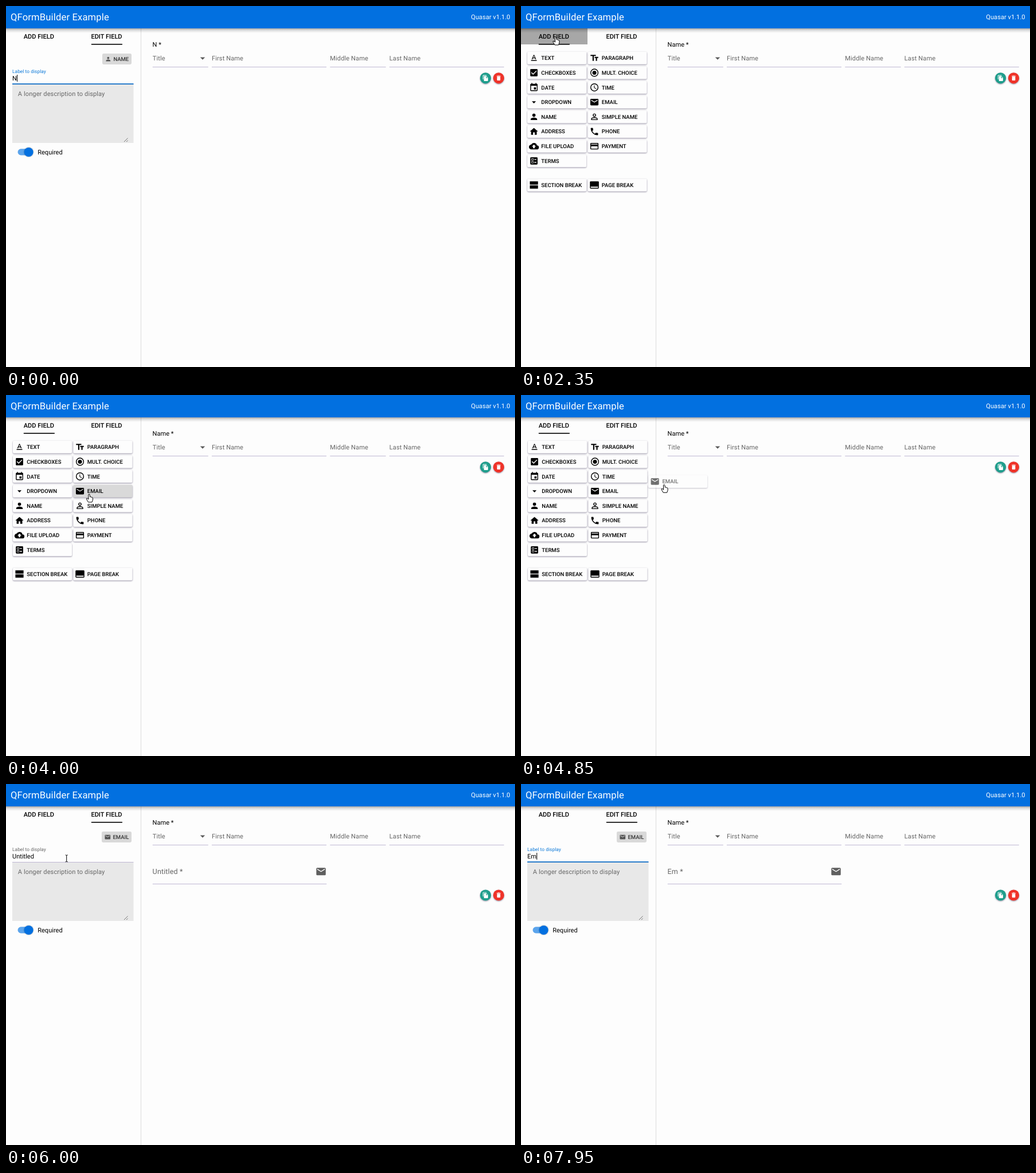
An HTML page for the animation above (8000 ms loop, 888 by 630 pixels).

```html
<!DOCTYPE html>
<html lang="en">
<head>
<meta charset="utf-8">
<title>Form builder</title>
<style>
html, body { margin: 0; width: 100%; height: 100%; overflow: hidden; background: #fdfdfd; }
svg { display: block; width: 888px; height: 630px; }
text { font-family: Roboto, Arial, sans-serif; font-size: 11.05px; white-space: pre; text-rendering: geometricPrecision; }
.tab { font-weight: 500; text-anchor: middle; }
.btn { font-weight: 500; font-size: 9.5px; }
.label { fill: #666; letter-spacing: .00937em; }
.raised { filter: drop-shadow(0 1px 1px rgba(40, 30, 70, .5)); }
</style>
</head>
<body>
<svg id="stage" viewBox="0 0 888 630">
  <defs>
    <linearGradient id="shade" x2="0" y2="1">
      <stop stop-color="#000" stop-opacity=".34"/>
      <stop offset=".4" stop-color="#000" stop-opacity=".13"/>
      <stop offset="1" stop-color="#000" stop-opacity="0"/>
    </linearGradient>
    <clipPath id="side"><rect y="39" width="235" height="591"/></clipPath>
  </defs>
  <rect width="888" height="630" fill="#fdfdfd"/>
</svg>
<script>
const LOOP = 8000, BLUE = '#0270e0', LINE = '#bfb8d4';
const ADD_AT = 2099, DROP_AT = 5227, FOCUS_AT = 6358;
const stage = document.getElementById('stage');

// Icons on a 24 unit grid
const ICONS = {
  text: 'M5 17v2h14v-2zM9.5 12.8h5l.9 2.2h2.1L12.75 4h-1.5L6.5 15h2.1zM12 6l1.87 5h-3.74z',
  paragraph: 'M2.5 4v3h5v12h3V7h5V4zM21.5 9h-9v3h3v7h3v-7h3z',
  check: 'M5 3h14a2 2 0 0 1 2 2v14a2 2 0 0 1-2 2H5a2 2 0 0 1-2-2V5a2 2 0 0 1 2-2zM10 17l9-9-1.4-1.4L10 14.2l-3.6-3.6L5 12z',
  radio: 'M2 12a10 10 0 1 0 20 0a10 10 0 1 0-20 0zM4 12a8 8 0 1 0 16 0a8 8 0 1 0-16 0zM7 12a5 5 0 1 0 10 0a5 5 0 1 0-10 0z',
  date: 'M17 12h-5v5h5zM16 1v2H8V1H6v2H5a2 2 0 0 0-2 2v14a2 2 0 0 0 2 2h14a2 2 0 0 0 2-2V5a2 2 0 0 0-2-2h-1V1zM19 19H5V8h14z',
  time: 'M2 12a10 10 0 1 0 20 0a10 10 0 1 0-20 0zM4 12a8 8 0 1 0 16 0a8 8 0 1 0-16 0zM12.5 7H11v6l5.25 3.15.75-1.23-4.5-2.67z',
  drop: 'M7 10l5 5 5-5z',
  email: 'M4 4h16a2 2 0 0 1 2 2v12a2 2 0 0 1-2 2H4a2 2 0 0 1-2-2V6a2 2 0 0 1 2-2zM20 8V6l-8 5-8-5v2l8 5z',
  person: 'M8 8a4 4 0 1 0 8 0a4 4 0 1 0-8 0zM12 14c-2.7 0-8 1.3-8 4v2h16v-2c0-2.7-5.3-4-8-4z',
  outline: 'M8 8a4 4 0 1 0 8 0a4 4 0 1 0-8 0zM9.9 8a2.1 2.1 0 1 0 4.2 0a2.1 2.1 0 1 0-4.2 0zM12 13c-2.7 0-8 1.3-8 4v3h16v-3c0-2.7-5.3-4-8-4zM12 14.9c3 0 6.1 1.5 6.1 2.1v1.1H5.9V17c0-.6 3.1-2.1 6.1-2.1z',
  home: 'M10 20v-6h4v6h5v-8h3L12 3 2 12h3v8z',
  phone: 'M6.6 10.8a15 15 0 0 0 6.6 6.6l2.2-2.2a1 1 0 0 1 1-.25 11 11 0 0 0 3.6.55 1 1 0 0 1 1 1V20a1 1 0 0 1-1 1A17 17 0 0 1 3 4a1 1 0 0 1 1-1h3.5a1 1 0 0 1 1 1 11 11 0 0 0 .57 3.6 1 1 0 0 1-.25 1z',
  upload: 'M19.35 10A7.5 7.5 0 0 0 5.35 8 6 6 0 0 0 6 20h13a5 5 0 0 0 .35-10zM14 13v4h-4v-4H7l5-5 5 5z',
  card: 'M4 4h16a2 2 0 0 1 2 2v12a2 2 0 0 1-2 2H4a2 2 0 0 1-2-2V6a2 2 0 0 1 2-2zM20 18v-6H4v6zM20 8V6H4v2z',
  terms: 'M5 3h14a2 2 0 0 1 2 2v14a2 2 0 0 1-2 2H5a2 2 0 0 1-2-2V5a2 2 0 0 1 2-2zM13 7.5v2h5v-2zM13 14.5v2h5v-2zM6 6v5h5V6zM7 7h3v3H7zM6 13v5h5v-5zM7 14h3v3H7z',
  section: 'M2 3h20v8H2zM2 13h20v8H2z',
  page: 'M3 3h18a2 2 0 0 1 2 2v14a2 2 0 0 1-2 2H3a2 2 0 0 1-2-2V5a2 2 0 0 1 2-2zM3 16v3h18v-3z',
  copy: 'M16 1H4a2 2 0 0 0-2 2v14h2V3h12zM15 5l6 6v10a2 2 0 0 1-2 2H8a2 2 0 0 1-2-2V7a2 2 0 0 1 2-2zM14 12h5.5L14 6.5z',
  trash: 'M6 19a2 2 0 0 0 2 2h8a2 2 0 0 0 2-2V7H6zM19 4h-3.5l-1-1h-5l-1 1H5v2h14z'
};

function add(parent, tag, attrs, content) {
  const node = document.createElementNS('http://www.w3.org/2000/svg', tag);
  set(node, attrs);
  if (content) node.textContent = content;
  return parent.appendChild(node);
}
function set(node, attrs) {
  for (const key in attrs) node.setAttribute(key, attrs[key]);
}
const group = (parent, attrs = {}) => add(parent, 'g', attrs);
const text = (parent, x, y, content, attrs) => add(parent, 'text', { x, y, ...attrs }, content);
const rect = (parent, x, y, width, height, fill, attrs) =>
  add(parent, 'rect', { x, y, width, height, fill, ...attrs });
const show = (node, on) => node.setAttribute('display', on ? 'inline' : 'none');
const move = (node, x, y = 0) => node.setAttribute('transform', `translate(${x} ${y})`);
function icon(parent, name, cx, cy, size, fill = '#000') {
  const k = size / 24;
  return add(parent, 'path', {
    d: ICONS[name], fill, 'fill-rule': 'evenodd',
    transform: `translate(${cx - size / 2} ${cy - size / 2}) scale(${k})`
  });
}

// Side panel
const side = group(stage, { 'clip-path': 'url(#side)' });
const tabGlow = rect(side, 0, 39, 116, 28, '#000');
const addPanel = group(side), editPanel = group(side);
text(side, 57.3, 57, 'ADD FIELD', { class: 'tab' });
text(side, 175.5, 57, 'EDIT FIELD', { class: 'tab' });
const marker = rect(side, 0, 66, 54, 1.6, '#000');

const buttons = [];
function button(name, label, col, cy) {
  const x = 12 + col * 105.5;
  const g = group(addPanel);
  const face = rect(g, x, cy - 11, 103, 22, '#fdfdfd', { rx: 2, class: 'raised' });
  icon(g, name, x + 11.5, cy, 17);
  text(g, x + 24.3, cy + 3.4, label, { class: 'btn' });
  buttons.push({ g, face, x, y: cy - 11 });
  return g;
}
const fields = [
  ['text', 'TEXT'], ['paragraph', 'PARAGRAPH'], ['check', 'CHECKBOXES'], ['radio', 'MULT. CHOICE'],
  ['date', 'DATE'], ['time', 'TIME'], ['drop', 'DROPDOWN'], ['email', 'EMAIL'],
  ['person', 'NAME'], ['outline', 'SIMPLE NAME'], ['home', 'ADDRESS'], ['phone', 'PHONE'],
  ['upload', 'FILE UPLOAD'], ['card', 'PAYMENT'], ['terms', 'TERMS']
];
fields.forEach(([name, label], i) => button(name, label, i % 2, 90.8 + (i >> 1) * 25.65));
button('section', 'SECTION BREAK', 0, 312.4);
button('page', 'PAGE BREAK', 1, 312.4);

function chip(name, label, x, width) {
  const g = group(editPanel);
  rect(g, x, 83, width, 19, '#d9d9d9', { rx: 2.4 });
  icon(g, name, x + 10.3, 92.6, 11.6, '#555');
  text(g, x + 19.4, 96, label, { class: 'btn', fill: '#333' });
  return g;
}
const nameChip = chip('person', 'NAME', 168, 51);
const emailChip = chip('email', 'EMAIL', 167, 52);
const caption = text(editPanel, 11, 117.4, 'Label to display', { class: 'label', style: 'font-size:8.3px' });
const selection = rect(editPanel, 11, 120, 39, 12.5, '#a9cdf4');
const input = text(editPanel, 11, 130, 'N');
const caret = rect(editPanel, 0, 120, 1, 12, '#000');
rect(editPanel, 11, 137, 211.5, 102, '#e8e8e8');
const inputLine = rect(editPanel, 11, 136, 211.5, 1, LINE);
const focusLine = rect(editPanel, 11, 135.2, 211.5, 1.7, '#0a6cc6');
text(editPanel, 20.8, 157, 'A longer description to display', { class: 'label' });
add(editPanel, 'path', { d: 'M206 237l6.5-6.5M210 237l2.5-2.5', stroke: '#555', 'stroke-width': .8 });
rect(editPanel, 20.5, 249.3, 24, 11.2, '#5ba4ec', { rx: 5.6 });
add(editPanel, 'circle', { cx: 39.6, cy: 255, r: 8, fill: BLUE, style: 'filter:drop-shadow(0 .6px .8px rgba(0,0,0,.35))' });
text(editPanel, 55.2, 259, 'Required');

// Form
rect(stage, 235, 39, 1, 591, '#dcdcdc');
const heading = text(stage, 255.6, 70.6, 'N *');
function field(label, x, width) {
  text(stage, x, 95, label, { class: 'label' });
  rect(stage, x, 106, width, 1, LINE);
}
field('Title', 255.8, 97);
field('First Name', 359, 200);
field('Middle Name', 565.3, 97.4);
field('Last Name', 668.8, 200);
icon(stage, 'drop', 343, 91.3, 20.5, '#5c5c5c');
const emailField = group(stage);
const emailLabel = text(emailField, 255.6, 157, '', { class: 'label', style: 'font-size:12.6px' });
rect(emailField, 255.8, 174, 303.5, 1, LINE);
icon(emailField, 'email', 549.6, 152.7, 19.7, '#5f5f5f');
const tools = group(stage);
[['copy', 836.6, '#1f9e8c'], ['trash', 859.5, '#ef3329']].forEach(([name, cx, fill]) => {
  add(tools, 'circle', { cx, cy: 125.8, r: 9.6, fill, class: 'raised' });
  icon(tools, name, cx, 125.7, 11.5, '#fff');
});

// Header
rect(stage, 0, 39, 888, 8, 'url(#shade)');
rect(stage, 0, 0, 888, 39, BLUE);
text(stage, 8, 24.8, 'QFormBuilder Example', { fill: '#fff', style: 'font-size:16.57px;letter-spacing:.01em' });
text(stage, 879.6, 23, 'Quasar v1.1.0', { fill: '#fff', 'text-anchor': 'end', style: 'font-size:11.15px' });

// Pointer
const ghost = group(stage, { opacity: .55 });
ghost.append(buttons[7].g.cloneNode(true));
const pointer = group(stage);
const shape = (d, attrs) => add(pointer, 'path', {
  d, fill: '#fff', stroke: '#000', 'stroke-width': 1, 'stroke-linejoin': 'round', ...attrs
});
const cursors = {
  hand: shape('M-1.2 .8Q0-.5 1.1.8L1.8 5 3 4.6 4.2 5.6 5.4 5.4 6.4 7V10L5 14H-1.5L-4.2 9.5-4.6 7.6-3.4 7.3-1 9Z'),
  arrow: shape('M0 0V12L2.8 9.4 4.7 13.6 6.5 12.8 4.7 8.8H8.4Z', { fill: '#000', stroke: '#fff' }),
  resize: shape('M-7 0l4-4v2.6h6V-4L7 0 3 4V1.4h-6V4z'),
  beam: shape('M-2-6Q0-6 0-4.5 0-6 2-6M0-4.5V4.5M-2 6Q0 6 0 4.5 0 6 2 6', { fill: 'none' }),
  ring: shape('M-13 1a8 8 0 1 0 16 0a8 8 0 1 0-16 0z', { 'stroke-width': 2 })
};

// Time, x, y
const route = [
  [1300, -12, 16], [1400, 0, 15.5], [1550, 16, 20], [1950, 60, 53], [2350, 60.5, 54], [3050, 61, 54],
  [3650, 143, 170], [4000, 145, 173], [4450, 145, 173], [5150, 317, 145.5], [5500, 317, 145.5],
  [6200, 54, 126], [FOCUS_AT, 52, 126], [6600, -1, 126], [6750, -20, 126]
];
function pointAt(t) {
  const i = route.findIndex(p => p[0] > t);
  if (i < 1) return [-40, 0];
  const [a, b] = [route[i - 1], route[i]];
  let p = (t - a[0]) / (b[0] - a[0]);
  p = p * p * (3 - 2 * p);
  return [a[1] + (b[1] - a[1]) * p, a[2] + (b[2] - a[2]) * p];
}
function cursorAt(t, x, y) {
  if (t < 1450) return 'resize';
  if (t > 6560) return 'ring';
  if (t > 5850) return 'beam';
  return y < 39 || t > 3080 && t < 3350 || t > 5600 ? 'arrow' : 'hand';
}

const clamp = p => Math.min(1, Math.max(0, p));
const easeOut = (t, start, span) => 1 - (1 - clamp((t - start) / span)) ** 3;
const typed = (word, t, start, step) => word.slice(0, Math.max(0, Math.floor((t - start) / step) + 1));

function draw(t) {
  const toAdd = easeOut(t, ADD_AT, 300), toEdit = easeOut(t, DROP_AT, 300);
  const dropped = t >= DROP_AT;
  move(addPanel, dropped ? -235 * toEdit : -235 * (1 - toAdd));
  move(editPanel, dropped ? 235 * (1 - toEdit) : 235 * toAdd);
  const markAdd = dropped ? 1 - easeOut(t, DROP_AT, 230) : easeOut(t, ADD_AT, 230);
  move(marker, 148.9 - 118.1 * markAdd);

  // Typing
  const name = typed('Name', t, 0, 170);
  const retyped = t >= 7700;
  const email = retyped ? typed('Em', t, 7700, 180) : 'Untitled';
  const value = dropped ? email : name;
  heading.textContent = name + ' *';
  emailLabel.textContent = email + ' *';
  input.textContent = value;
  show(nameChip, !dropped);
  show(emailChip, dropped);
  show(emailField, dropped);
  move(tools, 0, dropped ? 68.2 : 0);

  // Focus
  const focused = t < ADD_AT || t >= FOCUS_AT;
  const grow = t < ADD_AT ? 1 : easeOut(t, FOCUS_AT, 360);
  caption.setAttribute('fill', focused ? '#0a78d8' : '#666');
  caption.style.fill = focused ? '#0a78d8' : '#666';
  show(focusLine, focused);
  set(focusLine, { x: 116.75 - 105.75 * grow, width: 211.5 * grow });
  const over = t > 6200 && t < 6700;
  inputLine.setAttribute('fill', over ? '#222' : LINE);
  const lastKey = retyped ? 7880 : 510;
  const lit = t < lastKey || (t - lastKey) % 1000 < 550;
  show(caret, (t < ADD_AT || retyped) && lit);
  caret.setAttribute('x', 11 + input.getComputedTextLength() + .2);

  // Pointer, hover and drag
  const [x, y] = pointAt(t);
  const kind = cursorAt(t, x, y);
  move(pointer, x, y);
  for (const key in cursors) show(cursors[key], key === kind);
  const left = Math.max(11, Math.min(50, x));
  set(selection, { x: left, width: 50 - left });
  show(selection, t >= FOCUS_AT && !retyped);

  const onTab = t > 1600 && t < 3400 && x < 116 && y > 39 && y < 67;
  const ripple = t < ADD_AT - 100 ? 0 : 1 - clamp((t - 2500) / 300);
  tabGlow.setAttribute('opacity', onTab ? .14 + .2 * ripple : 0);
  const dragging = t > 4450 && !dropped;
  buttons.forEach(b => {
    const hit = t > 2500 && !dropped && !dragging &&
      x > b.x && x < b.x + 103 && y > b.y && y < b.y + 22;
    b.face.setAttribute('fill', hit ? '#d9d9d9' : '#fdfdfd');
  });
  show(ghost, dragging);
  move(ghost, x - 145, y - 173);
}

const start = performance.now();
function tick() {
  draw((performance.now() - start) % LOOP);
  requestAnimationFrame(tick);
}
tick();
</script>
</body>
</html>
```
